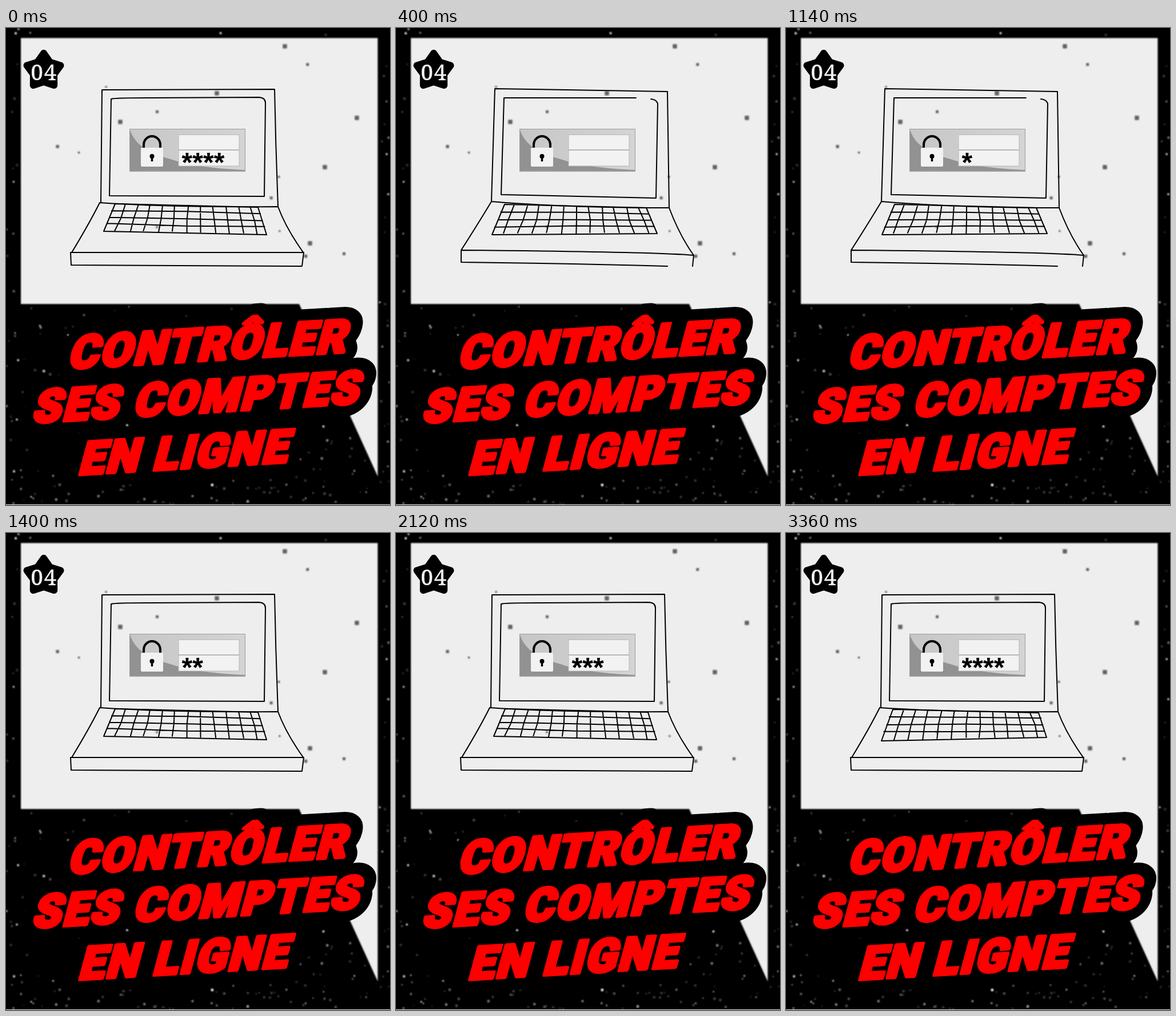
Animation, 672 px wide and 833 px high, one loop 3380 ms. Source, as an HTML page:

```html
<!DOCTYPE html>
<html lang="fr">
<head>
<meta charset="utf-8">
<title>Contrôler ses comptes en ligne</title>
<style>
  html, body { margin: 0; width: 100%; height: 100%; overflow: hidden; background: #000; }
  svg { display: block; width: 672px; height: 833px; }
  .ink path, #keys { fill: none; stroke: #000; stroke-width: 2; stroke-linecap: round; stroke-linejoin: round; }
  .title { font: 900 80.5px Roboto, sans-serif; letter-spacing: 2.9px; stroke-linejoin: round; }
  .back { fill: #000; stroke: #000; stroke-width: 46px; }
  .front { fill: #fe0000; stroke: #fe0000; stroke-width: 6px; }
  .badge { font: 38px "Noto Serif", serif; fill: #f4f4f4; stroke: #f4f4f4; stroke-width: .6px; letter-spacing: 2px; }
  .code { font: bold 48px "Liberation Sans", Arial, sans-serif; }
</style>
</head>
<body>
<svg viewBox="0 0 672 833">
  <defs>
    <filter id="soft" x="-5%" y="-5%" width="110%" height="110%"><feGaussianBlur stdDeviation=".8"/></filter>
    <linearGradient id="panel"><stop stop-color="#c6c6c6"/><stop offset="1" stop-color="#d4d4d4"/></linearGradient>
    <g id="words">
      <text transform="matrix(.998 -.06 -.27 1 107 595)">CONTRÔLER</text>
      <text transform="matrix(.998 -.06 -.27 1 44 689.5)">SES COMPTES</text>
      <text transform="matrix(.998 -.06 -.27 1 125 780)">EN LIGNE</text>
    </g>
  </defs>

  <rect width="672" height="833"/>
  <path d="M26 17.5H650.5V783L513 482H26Z" fill="#eeeeee" filter="url(#soft)"/>
  <g id="specks" filter="url(#soft)"></g>
  <rect y="832" width="672" height="1" fill="#eeeeee"/>

  <path id="star" stroke="#000" stroke-width="12" stroke-linejoin="round"/>
  <text class="badge" x="43.500" y="91">04</text>

  <g class="ink lid">
    <path d="M166 305L168 108 470 107 Q472 210 476 311"/>
    <path d="M184 124Q190 122 250 122L443 121Q454 122 454 131L452 294 181 293Z"/>
    <path d="M115 392Q146 341 164 305Q300 314 476 312Q490 350 521 393"/>
    <path d="M113 392H521L518 416 114 414Z"/>
  </g>
  <g class="ink lid">
    <path d="M167 303L173 106 475 111 478 314"/>
    <path d="M420 122H189L184 291 455 297 458 132Q456 125 446 124"/>
    <path d="M114 388Q146 338 167 303Q300 314 478 314Q496 362 521 397"/>
    <path d="M475 416Q300 411 114 409V388Q460 391 521 397L519 416"/>
  </g>
  <path id="keys"/>

  <rect x="216" y="176" width="203" height="74.500" fill="url(#panel)"/>
  <path d="M216 176C226 204 246 217 288 229C320 240 370 246 419 248V250.500H216Z" fill="#929292"/>
  <rect x="216.500" y="176.500" width="202" height="73.500" fill="none" stroke="#9c9c9c"/>
  <g fill="#f2f2f2" stroke="#b8b8b8">
    <rect x="302" y="186.500" width="106" height="26"/>
    <rect x="302" y="213.500" width="106" height="27.500"/>
  </g>
  <path d="M241 211V204A14.500 15 0 0 1 270 204V211" fill="none" stroke="#000" stroke-width="4"/>
  <rect x="236" y="209" width="39" height="33" rx="2" fill="#f2f2f2"/>
  <path d="M255.500 225V233" stroke="#000" stroke-width="3.400"/>
  <circle cx="255.500" cy="224" r="4"/>
  <text class="code" id="code" x="307.600" y="251"></text>

  <g class="title">
    <use href="#words" class="back"/>
    <use href="#words" class="front"/>
  </g>
</svg>
<script>
const LOOP = 3380, STEP = 140, PHASES = 5;
const $ = q => document.querySelector(q);
const mix = (a, b, k) => a + (b - a) * k;

function random(seed) {
  return () => (seed = (seed * 16807) % 2147483647) / 2147483647;
}

// Five-pointed badge
const corner = i => {
  const r = i % 2 ? 19 : 31, a = i * Math.PI / 5;
  return [66 + r * Math.sin(a), 75 - r * Math.cos(a)];
};
$('#star').setAttribute('d', 'M' + Array.from({ length: 10 }, (_, i) => corner(i)).join('L') + 'Z');

function speck(x, y, size, fill, opacity) {
  const r = document.createElementNS('http://www.w3.org/2000/svg', 'rect');
  const attrs = { x: x - size / 2, y: y - size / 2, width: size, height: size, rx: 1, fill, opacity };
  for (const k in attrs) r.setAttribute(k, attrs[k]);
  $('#specks').append(r);
}

// Dust: large dark specks, small dark ones on paper, pale ones on black
function scatter() {
  const rnd = random(41);
  const onPaper = (x, y) =>
    x > 22 && x < 654 && y > 14 && (y < 486 || x > 509 + (y - 482) * .457);
  const large = [[369, 114], [200, 164], [614, 157], [532, 376], [488, 32], [558, 243]];
  large.forEach(([x, y]) => speck(x, y, 7.5, '#333', .75));
  for (let i = 0; i < 11; i++) speck(mix(90, 630, rnd()), mix(40, 465, rnd()), mix(3, 5.5, rnd()), '#333', .75);
  const tints = ['#f0f0f0', '#d2d2ea', '#e6e6cc'];
  for (let i = 0; i < 640; i++) {
    const x = rnd() * 672, y = 832 * rnd() ** .7, glow = rnd() ** 2;
    if (!onPaper(x, y)) speck(x, y, mix(2, 4.5, rnd()), tints[i % 3], mix(.2, 1, glow));
  }
}
scatter();

// Hand-drawn grid inside a quad: top left, top right, bottom right, bottom left
function keyboard([tl, tr, br, bl], seed) {
  const rnd = random(seed);
  const wobble = v => v + (rnd() - .5) * 3;
  const at = (u, v) => [0, 1].map(k => wobble(mix(mix(tl[k], tr[k], u), mix(bl[k], br[k], u), v)));
  let d = `M${tl}L${tr}L${br}L${bl}Z`;
  for (let row = 0; row < 3; row++) {
    const v = .23 + row * .25;
    d += `M${at(0, v)}L${at(.5, v)}L${at(1, v)}`;
  }
  for (let col = 0; col < 11; col++) {
    const u = (col + .8) / 11.4;
    d += `M${at(u, .02)}L${at(u, .5)}L${at(u, .96)}`;
  }
  return d;
}

const first = [[191, 307], [441, 313], [456, 361], [171, 355]];
const second = [[190, 308], [438, 314], [457, 359], [168, 361]];
const third = [[187, 308], [442, 314], [456, 357], [167, 363]];
const opening = keyboard(first, 7);
const boards = [opening, keyboard(second, 19), opening, keyboard(second, 53), keyboard(third, 88)];

const lids = document.querySelectorAll('.lid');
const start = performance.now();

function draw() {
  const t = (performance.now() - start) % LOOP;
  const n = Math.floor((t + 20) / STEP), phase = n % PHASES;
  const typed = t < 20 ? 4 : Math.floor(n / PHASES); // the full code lingers into the next loop
  lids.forEach((lid, i) => lid.style.display = phase % 2 === i ? '' : 'none');
  $('#keys').setAttribute('d', boards[phase]);
  $('#code').textContent = '*'.repeat(typed);
  requestAnimationFrame(draw);
}
draw();
</script>
</body>
</html>
```
